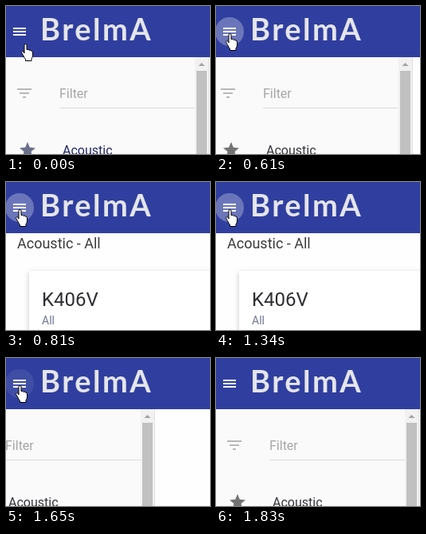
These frames come from a looping animation (256x185 px, 1910 ms). An HTML page:

```html
<!DOCTYPE html>
<html lang="en">
<head>
<meta charset="utf-8">
<title>Drawer toggle</title>
<style>
  html, body { margin: 0; width: 100%; height: 100%; overflow: hidden; background: #fefefe; }
  svg { display: block; width: 256px; height: 185px; font-family: Roboto, Arial, sans-serif; }
  .logo { font: 700 38px Lato, sans-serif; letter-spacing: 2.5px; fill: #e4e5ea; }
  .card { fill: #fff; filter: drop-shadow(0 2px 3px rgba(0, 0, 0, .22)); }

  .page, .drawer, .ripple, .hand, .item, .star { animation: 1910ms step-end infinite; }
  .page { animation-name: page; }
  .drawer { animation-name: drawer; }
  .ripple { animation-name: ripple; }
  .hand { animation-name: hand; }
  .item { animation-name: item; }
  .star { animation-name: star; }

  @keyframes page {
    0% { transform: translateX(256px); }
    31.93% { transform: translateX(248px); }
    36.12% { transform: translateX(167px); }
    40.83% { transform: translateX(31px); }
    42.4% { transform: translateX(0); }
    78% { transform: translateX(8px); }
    82.19% { transform: translateX(150px); }
    86.38%, 100% { transform: translateX(256px); }
  }
  @keyframes drawer {
    0% { transform: translateX(0); }
    31.93% { transform: translateX(-8px); }
    36.12% { transform: translateX(-89px); }
    40.83% { transform: translateX(-225px); }
    42.4% { transform: translateX(-262px); }
    82.19% { transform: translateX(-180px); }
    86.38% { transform: translateX(-68px); }
    91.62% { transform: translateX(-12px); }
    95.81%, 100% { transform: translateX(0); }
  }
  @keyframes ripple {
    0% { opacity: 0; }
    15.7% { opacity: .29; }
    73.82% { opacity: .27; }
    78% { opacity: .24; }
    82.19% { opacity: .15; }
    86.38% { opacity: .08; }
    91.62% { opacity: .03; }
    95.81%, 100% { opacity: 0; }
  }
  @keyframes hand {
    0% { transform: translate(19px, 47px); opacity: 1; }
    3.66% { transform: translate(9px, 38px); opacity: 1; }
    7.85% { transform: translate(1px, 31px); opacity: 1; }
    15.7% { transform: translate(12px, 34px); opacity: 1; }
    95.81%, 100% { transform: translate(12px, 34px); opacity: 0; }
  }
  @keyframes item {
    0% { fill: #20286a; }
    31.93%, 100% { fill: #36363e; }
  }
  @keyframes star {
    0% { fill: #6a6f8b; }
    31.93%, 100% { fill: #737373; }
  }
</style>
</head>
<body>
<svg viewBox="0 0 256 185">
  <g class="page">
    <text x="14" y="83" font-size="18" fill="#3a3a3a">Acoustic - All</text>
    <rect class="card" x="29" y="111" width="300" height="120"/>
    <text x="45" y="155" font-size="24" fill="#2e2e32">K406V</text>
    <text x="45" y="178" font-size="14" fill="#707892">All</text>
  </g>

  <g class="drawer">
    <rect y="60" width="255" height="125" fill="#fafafa"/>
    <path d="M254.500 64v121" stroke="#e2e2e2"/>
    <path d="M14 103h18v2H14zM17 108h12v2H17zM21 113h4v2h-4z" fill="#b8b8b8"/>
    <text x="67" y="115" font-size="16" fill="#a6a6a6">Filter</text>
    <path d="M67 127.5h170" stroke="#dcdcdc"/>
    <path class="star" d="M27 170l2.8 6.8 7.2.6-5.5 4.7 1.7 7.1-6.2-3.8-6.2 3.8 1.7-7.1-5.5-4.7 7.2-.6z"/>
    <text class="item" x="71" y="186" font-size="16">Acoustic</text>
    <path d="M237 64h17v121h-17z" fill="#f1f1f1"/>
    <path d="M239 81h13v104h-13z" fill="#c1c1c1"/>
    <path d="M241.5 75l4-4 4 4z" fill="#a3a3a3"/>
  </g>

  <rect width="256" height="64" fill="#303f9f"/>
  <circle class="ripple" cx="17" cy="32" r="18" fill="#fff"/>
  <path d="M9 27h16v2H9zM9 31h16v2H9zM9 35h16v2H9z" fill="#fff"/>
  <text class="logo" x="43" y="43">BrelmA</text>

  <path class="hand" fill="#fff" stroke="#000" stroke-linejoin="round"
    d="M4 2q0-1.5 1.5-1.5T7 2v5.5q2.4-.6 2.8.8 2.2-.6 2.6.8 2.1-.2 2.1 1.8v4q0 2-1.5 4v2.6H5.5v-2q-1.8-2-3-5L.7 11.600q-.5-1.800.8-2 1 0 2.500 2.400z"/>
</svg>
</body>
</html>
```
